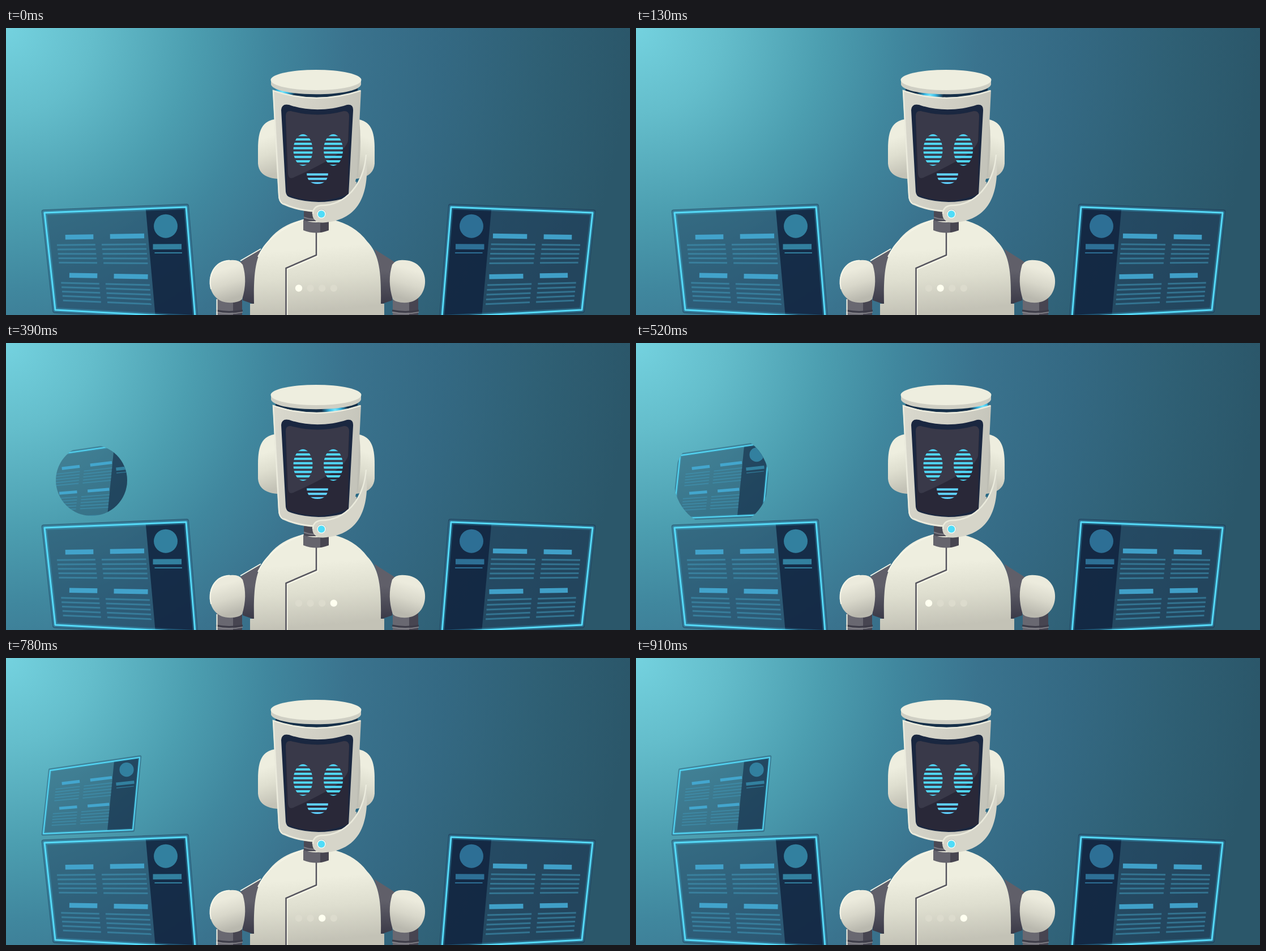
An HTML page for the animation above (1.04 s loop, 1102 by 508 pixels).

```html
<!DOCTYPE html>
<html lang="en">
<head>
<meta charset="utf-8">
<title>Robot assistant</title>
<style>
  html, body { margin: 0; width: 100%; height: 100%; overflow: hidden; background: #3a738e; }
  svg { display: block; width: 100%; height: 100%; }
  .frame { fill: #1a304e; stroke: #1a304e; stroke-linejoin: round; opacity: .45; }
  .side { fill: #10213c; fill-opacity: .8; }
  .halo, .neon { fill: none; stroke: #45cdf5; stroke-linejoin: round; }
  .halo { stroke-opacity: .25; }
  .neon { stroke: #55daf8; }
  .bar { stroke: #45acd6; stroke-opacity: .88; }
  .row { stroke: #4198b9; stroke-opacity: .55; }
  .disc { fill: #32809f; }
  .tag { stroke: #32809f; }
  #right .disc { fill: #2d6f95; }
  #right .tag { stroke: #2d6f95; }
  #popup .frame { opacity: .38; }
  #popup .side { fill-opacity: .55; }
  .rim { fill: none; stroke: #f6f6e8; stroke-width: 2; }
  .soft { fill: none; stroke: #ebebdd; stroke-width: 2.5; }
</style>
</head>
<body>
<svg viewBox="0 0 1102 508" preserveAspectRatio="none">
  <defs>
    <radialGradient id="bg" gradientUnits="userSpaceOnUse" cx="0" cy="0" r="1102">
      <stop offset="0" stop-color="#74d2df"/><stop offset=".14" stop-color="#64bdcb"/>
      <stop offset=".3" stop-color="#4c9eb0"/><stop offset=".42" stop-color="#40879e"/>
      <stop offset=".55" stop-color="#3a738e"/><stop offset=".7" stop-color="#346983"/>
      <stop offset=".85" stop-color="#2f6075"/><stop offset="1" stop-color="#2b576a"/>
    </radialGradient>
    <linearGradient id="body" x2=".12" y2="1">
      <stop offset=".35" stop-color="#eeeedf"/><stop offset=".65" stop-color="#dedecf"/><stop offset="1" stop-color="#c3c2b6"/>
    </linearGradient>
    <linearGradient id="ball" x2=".25" y2="1">
      <stop offset=".3" stop-color="#ecebdd"/><stop offset=".65" stop-color="#d8d7ca"/><stop offset="1" stop-color="#b9b8ae"/>
    </linearGradient>
    <linearGradient id="head" x2="1" y2=".3">
      <stop offset="0" stop-color="#dad9ce"/><stop offset=".6" stop-color="#cfcec3"/><stop offset="1" stop-color="#c4c4ba"/>
    </linearGradient>
    <linearGradient id="joint" x2="0" y2="1">
      <stop offset=".4" stop-color="#605f69"/><stop offset="1" stop-color="#3a3947"/>
    </linearGradient>
    <radialGradient id="spark">
      <stop offset="0" stop-color="#7becff"/><stop offset=".4" stop-color="#3bb9e4"/><stop offset="1" stop-color="#3bb9e4" stop-opacity="0"/>
    </radialGradient>
    <pattern id="scan" patternUnits="userSpaceOnUse" y="187.5" width="20" height="7.75">
      <rect width="20" height="4" fill="#50d8f8"/>
    </pattern>
    <clipPath id="gap"><path d="M476 104Q548 122 621 104V112Q548 136 476 112Z"/></clipPath>
    <clipPath id="iris"><circle id="reveal" cx="151" cy="243"/></clipPath>
    <g id="shoulder">
      <path d="M414 414L450 391Q437 425 438 489L418 482Z" fill="url(#joint)"/>
      <path d="M395 411Q412 409 418 419Q427 448 417 480Q410 487 392 486C350 484 347 414 395 411Z" fill="url(#ball)"/>
    </g>
    <g id="arm">
      <path d="M372 476H417V508H372Z" fill="#696871"/>
      <path d="M401 476H417V508H401Z" fill="#474551"/>
      <path d="M371 500Q394 505 418 500" fill="none" stroke="#3d3c48" stroke-width="3"/>
      <path d="M371 503Q394 508 418 503" fill="none" stroke="#85848a" stroke-width="1.5"/>
    </g>
    <path id="ear" d="M478 161C452 164 445 181 445 215V240Q447 265 480 267Z" fill="url(#body)"/>
  </defs>

  <rect width="1102" height="508" fill="url(#bg)"/>
  <g id="popup" clip-path="url(#iris)"></g>
  <g id="left"></g>
  <g id="right" transform="matrix(-1 0 0 1 1104 0)"></g>

  <!-- arms and torso -->
  <use href="#arm"/>
  <use href="#arm" x="311"/>
  <use href="#shoulder"/>
  <use href="#shoulder" transform="matrix(-1 0 0 1 1100 0)"/>
  <path d="M372.5 480V508M414 412L450 391M395 411.5C366 413 357 440 362 462" class="rim"/>
  <path d="M431 508V488H438C437 430 441 400 462 378Q484 348 525 339H575Q616 348 638 378C659 400 663 430 662 488H668V508Z" fill="url(#body)"/>
  <path d="M445 405Q465 362 525 339.5M550.5 364V404L496.500 427V508" class="rim"/>
  <path d="M548 362V402L494.5 425V508" fill="none" stroke="#55545e" stroke-width="2.5"/>
  <g id="dots"></g>

  <!-- neck -->
  <path d="M526 318H566V342H526Z" fill="#4b4a55"/>
  <path d="M526 335Q540 341 566 337" fill="none" stroke="#7b7a82" stroke-width="2"/>
  <path d="M525 340Q548 348 570 340V358Q548 367 525 358Z" fill="#65646d"/>
  <path d="M555 343L570 340V358L555 362Z" fill="#474550"/>

  <!-- head -->
  <use href="#ear"/>
  <use href="#ear" transform="matrix(-1 0 0 1 1096 0)"/>
  <path d="M624 163Q629 212 621 264L616 262V162Z" fill="#bdbdb3"/>
  <path d="M476 104Q548 122 621 104V116Q548 140 476 116Z" fill="#163049"/>
  <g clip-path="url(#gap)"><ellipse id="glow" rx="24" ry="12" fill="url(#spark)"/></g>
  <path d="M471 110Q548 136 627 110L618 292Q615 326 548 326Q513 324 490 313Q481 308 481 295Z" fill="url(#head)"/>
  <path d="M490 312Q482 308 482 295L472 111Q548 137 626 111M490 311Q515 323 548 324" class="soft"/>
  <path d="M468 93V100C474 123 622 123 627 100V93Z" fill="#cfcfc4"/>
  <ellipse cx="547.5" cy="92" rx="80" ry="18" fill="#eeeedf"/>

  <!-- face -->
  <path d="M486 145Q487 133 500 136C530 147 570 147 602 136Q614 134 613 147L605 294Q604 300 596 302Q573 308 552 308Q520 307 500 299Q495 297 494 290Z" fill="#1a2740"/>
  <path d="M494 156Q494 146 503 147Q550 160 597 147Q606 147 606 156L604 294Q573 306 550 306Q518 305 496 294Z" fill="#292838"/>
  <path d="M494 156Q494 146 503 147Q550 160 597 147Q606 147 606 156L604 200Q600 214 577 229Q550 246 507 265Q499 268 498 258Z" fill="#393949"/>
  <g id="open" fill="url(#scan)">
    <ellipse cx="524.5" cy="216" rx="17" ry="28"/>
    <ellipse cx="578" cy="216" rx="17" ry="28"/>
  </g>
  <g id="shut" fill="#50d8f8">
    <path id="lid" d="M511 215Q524 211 537 215ZM510 218.500H539Q524 223 510 218.500Z"/>
    <use href="#lid" x="53"/>
  </g>
  <path d="M531 255H569Q569 276 550 276Q531 276 531 255Z" fill="url(#scan)" style="filter: hue-rotate(12deg)"/>

  <!-- microphone -->
  <path d="M618 267H622V272H617Z" fill="#286985"/>
  <path d="M636 222C641 275 636 340 560 344.5C535 346 536 315 556 313C600 314 632 277 636 222Z" fill="#d6d5c9"/>
  <path d="M636 224C632 277 600 314 556 314Q542 316 542 329" class="soft"/>
  <circle cx="557" cy="329" r="8.5" fill="#bfc5c0"/>
  <circle cx="557" cy="329.5" r="7" fill="#4fdcf8" stroke="#f6fbf2" stroke-width="1.5"/>
</svg>
<script>
const $ = id => document.getElementById(id);
const mix = (a, b, t) => a + (b - a) * t;

// A dashboard laid out in unit coordinates and fitted between four corners.
function panel([tl, tr, br, bl], size, [dx, dy] = [0, 0]) {
  const at = (u, v) => [0, 1].map(i => mix(mix(tl[i], tr[i], u), mix(bl[i], br[i], u), v));
  const inner = (u, v) => { const [x, y] = at(u, v); return [x + dx, y + dy]; };
  const box = (cls, u0, u1, pad, width) => {
    const pts = [at(u0, -pad), at(u1, -pad), at(u1, 1 + pad), at(u0, 1 + pad)];
    return `<polygon class="${cls}" points="${pts.join(' ')}" stroke-width="${width * size}"/>`;
  };
  const line = (cls, u0, u1, v, width) =>
    `<path class="${cls}" d="M${inner(u0, v)}L${inner(u1, v)}" stroke-width="${width * size}"/>`;

  const [cx, cy] = inner(.845, .168);
  let s = box('frame', -.005, 1.005, .01, 8) + box('side', .715, 1, 0, 0)
    + box('halo', 0, 1, 0, 8) + box('neon', 0, 1, 0, 3)
    + `<circle class="disc" cx="${cx}" cy="${cy}" r="${21 * size}"/>`
    + line('tag', .742, .945, .358, 9.5) + line('tag', .75, .945, .415, 2);
  for (const top of [.255, .64])
    for (const [u0, u1] of [[.063, .335], [.38, .695]]) {
      s += line('bar', u0 + .065, u1 - .008, top, 8.5);
      for (let i = 0; i < 5; i++) s += line('row', u0, u1, top + .078 + i * .045, 3);
    }
  return s;
}

$('left').innerHTML = $('right').innerHTML = panel([[68, 327], [318, 317], [334, 512], [87, 499]], 1);
$('popup').innerHTML = panel([[78, 199], [236, 176], [224, 304], [66, 311]], .6, [3.5, -3]);

const dots = [0, 1, 2, 3].map(i => `<circle cx="${517 + 20.6 * i}" cy="460.5" r="6.2"/>`);
$('dots').innerHTML = dots.join('');
const radii = [0, 0, 19, 63, 84, 140];

function draw(now) {
  const k = Math.floor(now / 130) % 8;
  [...$('dots').children].forEach((d, i) => d.setAttribute('fill', i === k % 4 ? '#fffff0' : '#dcdbcd'));
  $('reveal').setAttribute('r', radii[Math.min(k, 5)]);
  const x = 488 + 31 * k;
  $('glow').setAttribute('cx', x);
  $('glow').setAttribute('cy', 121 - 8 * ((x - 548) / 60) ** 2);
  $('glow').style.display = k < 5 ? '' : 'none';
  $('open').style.display = k === 2 ? 'none' : '';
  $('shut').style.display = k === 2 ? '' : 'none';
  requestAnimationFrame(draw);
}
draw(performance.now());
</script>
</body>
</html>
```
